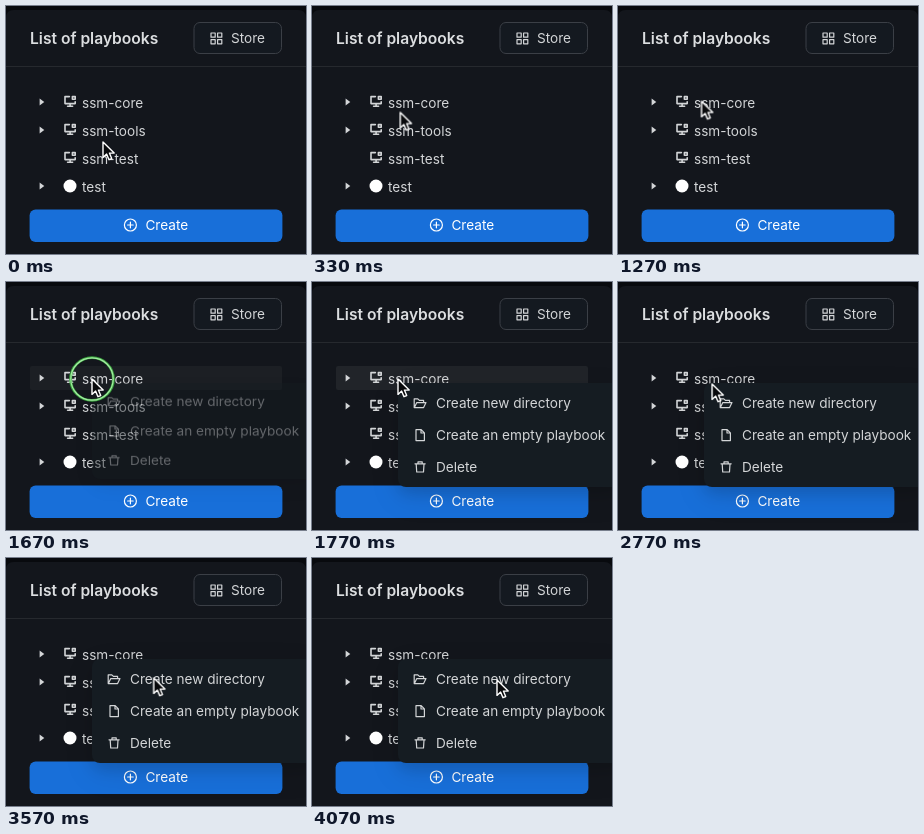
Animation of 300x248 px, one loop 4460 ms. Source, as an HTML page:

```html
<!DOCTYPE html>
<html lang="en">
<head>
<meta charset="utf-8">
<title>Playbook list</title>
<style>
  html, body { margin: 0; width: 100%; height: 100%; overflow: hidden; background: #080a0e; }
  svg { display: block; width: 300px; height: 248px; }
  text { font: 400 13.6px Inter, "Liberation Sans", sans-serif; fill: #d3d5d7; }
  .title { font-weight: 600; font-size: 15.6px; fill: #dcdee0; }
  .on { fill: #fff; }
  .line { fill: none; stroke: #d3d5d7; stroke-width: 1.2; stroke-linejoin: round; stroke-linecap: round; }
  .bold { stroke-width: 1.6; }
  .shadow { filter: drop-shadow(0 6px 8px rgba(0, 0, 0, .12)) drop-shadow(0 9px 14px rgba(0, 0, 0, .08)); }

  .cursor, .menu, .hover, .ring { animation: 4460ms linear infinite; }
  .cursor { animation-name: move; }
  .menu { animation-name: open; transform-origin: 86px 101px; }
  .hover { animation-name: hover; }
  .ring { animation-name: press; }

  @keyframes move {
    0%, .67% { transform: translate(97px, 136px); animation-timing-function: ease-in-out; }
    11.88% { transform: translate(84px, 92px); animation-timing-function: ease-in-out; }
    17.26%, 25.34% { transform: translate(83px, 95px); animation-timing-function: ease-in-out; }
    36.1%, 49.33% { transform: translate(86px, 97px); animation-timing-function: ease-in; }
    62.11% { transform: translate(94px, 102px); animation-timing-function: ease-out; }
    71.75% { transform: translate(119px, 117px); }
    74.66%, 77.8% { transform: translate(119px, 118px); }
    80.04% { transform: translate(147.5px, 120px); animation-timing-function: ease-out; }
    89.01%, 100% { transform: translate(185px, 122px); }
  }
  @keyframes open {
    0%, 36.55% { opacity: 0; transform: scaleY(.8); }
    37.44% { opacity: .42; transform: scaleY(.92); animation-timing-function: ease-out; }
    39.6%, 100% { opacity: 1; transform: none; }
  }
  @keyframes hover {
    0%, 35% { opacity: 0; }
    37.44% { opacity: .65; }
    39%, 56% { opacity: 1; }
    60.5%, 100% { opacity: 0; }
  }
  @keyframes press {
    0%, 35.6% { opacity: 0; }
    36.5%, 37.7% { opacity: 1; }
    39.2%, 100% { opacity: 0; }
  }
</style>
</head>
<body>
<svg viewBox="0 0 300 248">
  <defs>
    <path id="arrow" d="M33.6 -3.6 L38.3 0 L33.6 3.6 Z" fill="#d3d5d7"/>
    <g id="screen" class="line bold">
      <path d="M63.4 -5.4 H59 V1.6 H69.2 V-.2 M64.1 1.8 V4 M61.6 4.2 H66.6"/>
      <path d="M66.4 -5.4 H69.2 V-2.8 H66.4 Z"/>
    </g>
  </defs>

  <path d="M0 248 V12 Q0 4 8 4 H292 Q300 4 300 12 V248 Z" fill="#13161c"/>
  <path d="M0 60.5 H300" stroke="#26292e"/>
  <text class="title" x="24" y="37.5">List of playbooks</text>

  <rect x="188" y="16.5" width="87.5" height="31" rx="6" fill="#141920" stroke="#3b3f46"/>
  <g class="line">
    <rect x="205" y="27" width="4.2" height="4.2"/>
    <rect x="211.6" y="27" width="4.2" height="4.2"/>
    <rect x="205" y="33.6" width="4.2" height="4.2"/>
    <rect x="211.6" y="33.6" width="4.2" height="4.2"/>
  </g>
  <text x="225" y="37">Store</text>

  <rect class="hover" x="24" y="84" width="252" height="24" rx="2" fill="#212429"/>
  <g transform="translate(0 96)"><use href="#arrow"/><use href="#screen"/><text x="76" y="5.8">ssm-core</text></g>
  <g transform="translate(0 124)"><use href="#arrow"/><use href="#screen"/><text x="76" y="5.8">ssm-tools</text></g>
  <g transform="translate(0 152)"><use href="#screen"/><text x="76" y="5.8">ssm-test</text></g>
  <g transform="translate(0 180)"><use href="#arrow"/><circle cx="64" cy="0" r="6.5" fill="#fff"/><text x="76" y="5.8">test</text></g>

  <rect x="23.6" y="203.6" width="252.8" height="32.4" rx="6" fill="#186fd9"/>
  <g class="line" style="stroke:#fff">
    <circle cx="124.4" cy="219" r="6"/>
    <path d="M121.6 219 H127.2 M124.4 216.2 V221.8"/>
  </g>
  <text class="on" x="139.4" y="224.3">Create</text>

  <g class="menu">
    <rect class="shadow" x="86" y="101" width="223" height="104" rx="8" fill="#151c22"/>
    <g class="line">
      <path d="M103.8 125.6 H102.2 V116.8 H105.8 L107.4 118.4 H111.6 V120.4 M102.4 125.6 L104.8 120.6 H114 L111.6 125.6 Z"/>
      <path d="M104 147.6 H109.2 L112.4 150.8 V158.6 H104 Z M109 147.8 V151 H112.2"/>
      <path d="M103 181.8 H113.2 M106 181.6 V179.8 H110.2 V181.6 M104.2 182 L104.7 190 H111.5 L112 182"/>
    </g>
    <text x="124" y="126">Create new directory</text>
    <text x="124" y="158">Create an empty playbook</text>
    <text x="124" y="190">Delete</text>
  </g>

  <g class="ring" fill="none">
    <circle cx="86" cy="97" r="21.4" stroke="#38a53c" stroke-width="2.8"/>
    <circle cx="86" cy="97" r="21.2" stroke="#a5e8a4" stroke-width="1.2"/>
  </g>

  <path class="cursor" d="M0 0 V15.4 L3.6 12.1 L6 17.7 L8.7 16.6 L6.4 11.1 H11.2 Z" fill="#08090b" stroke="#fff" stroke-width="1.4" stroke-linejoin="round"/>
</svg>
</body>
</html>
```
